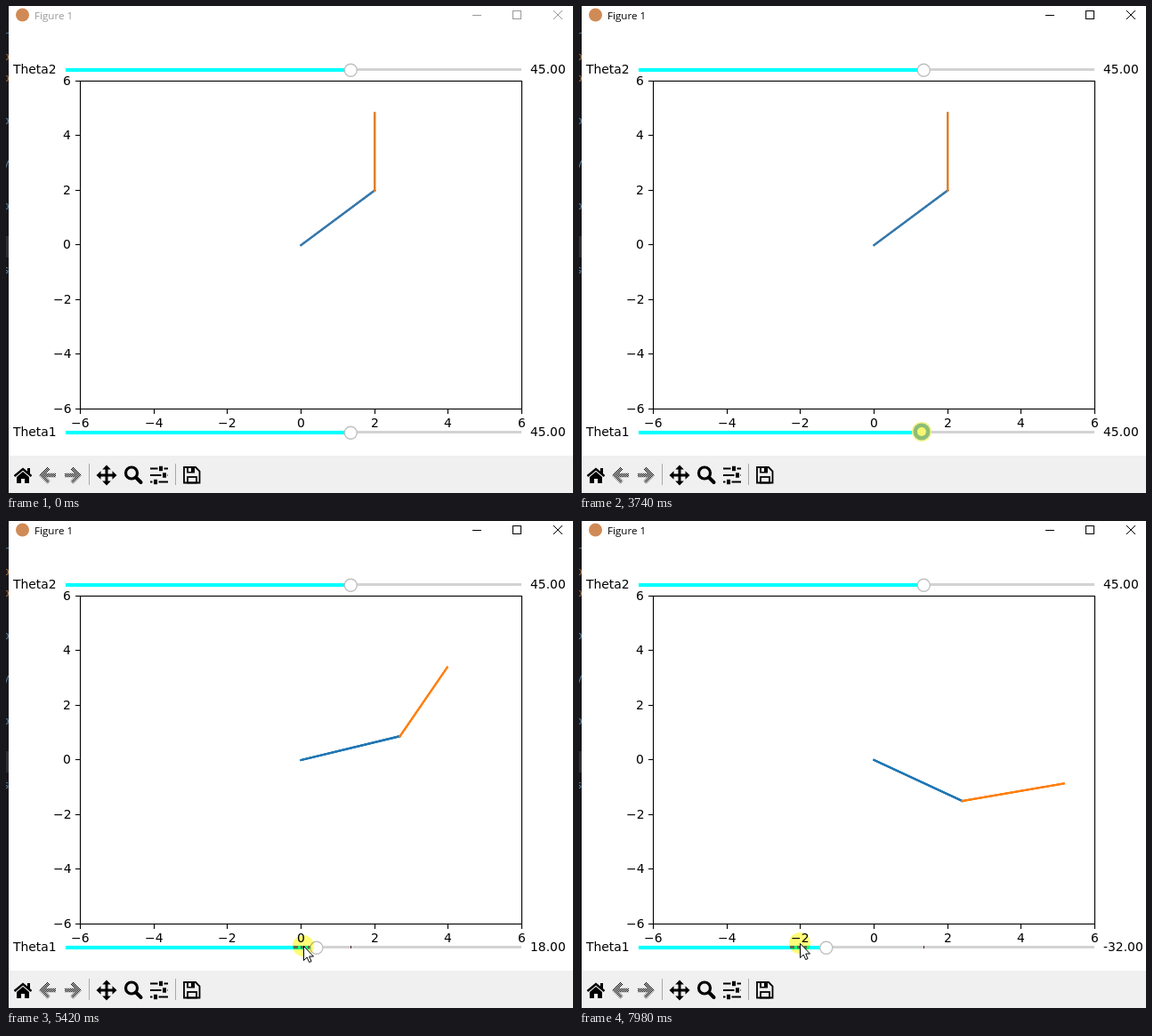
Write an HTML page with a canvas that moves like this. It is 637 px wide and 548 px high and loops after 8000 ms.

```html
<!DOCTYPE html>
<html lang="en">
<head>
<meta charset="utf-8">
<title>Arm sliders</title>
<style>
html, body { margin: 0; width: 100%; height: 100%; overflow: hidden; background: #fff; }
canvas { display: block; }
</style>
</head>
<body>
<canvas id="stage" width="637" height="548"></canvas>
<script>
const W = 637, H = 548, LOOP = 8000, TAU = Math.PI * 2;
const ctx = document.getElementById('stage').getContext('2d');
const PLOT_FONT = '13.89px "DejaVu Sans", sans-serif';
const HAIR = 1.11;

// plot box, limits -6..6 on both axes
const BOX = { x: 83.5, y: 84.5, w: 496, h: 369 };
const plotX = v => BOX.x + BOX.w * (v + 6) / 12;
const plotY = v => BOX.y + BOX.h * (6 - v) / 12;
const sliderX = deg => 67 + 512 * (deg + 180) / 360;
const ARM = 2 * Math.SQRT2;

// moments of the story
const ENTER = 430, CLICK = 1770, RELEASE = 1950, PRESS = 3030, HOLD = 3360, DRAG = 3820;

// time, x, y of the pointer tip
const POINTER = [
  [ENTER, 517, 545], [1200, 392, 484], [1640, 407, 455], [2130, 407, 455],
  [2400, 387, 497], [2600, 387, 480], [3740, 385, 479], [4300, 372, 481],
  [5420, 334, 478], [6310, 311, 481], [7150, 284, 477], [7980, 248, 475]
];
// time, degrees of the lower slider
const ANGLE = [[3780, 45], [4300, 39], [4960, 32], [5420, 18], [6310, -6], [6870, -9], [7150, -18], [7980, -32]];

function sample(keys, t) {
  const n = keys.findIndex(k => k[0] > t);
  if (n === 0) return keys[0].slice(1);
  if (n < 0) return keys[keys.length - 1].slice(1);
  const a = keys[n - 1], b = keys[n], f = (t - a[0]) / (b[0] - a[0]);
  return a.map((v, i) => v + (b[i] - v) * f).slice(1);
}

function rect(x, y, w, h, color) {
  ctx.fillStyle = color;
  ctx.fillRect(x, y, w, h);
}

function frame(x, y, w, h, color, width) {
  ctx.strokeStyle = color;
  ctx.lineWidth = width;
  ctx.strokeRect(x, y, w, h);
}

function disc(x, y, r, color) {
  ctx.fillStyle = color;
  ctx.beginPath();
  ctx.arc(x, y, r, 0, TAU);
  ctx.fill();
}

function outline(color, width, cap = 'butt') {
  ctx.strokeStyle = color;
  ctx.lineWidth = width;
  ctx.lineCap = cap;
  ctx.stroke();
}

function trace(pts, close) {
  ctx.beginPath();
  pts.forEach(p => ctx.lineTo(...p));
  if (close) ctx.closePath();
}

function poly(pts, color) {
  trace(pts, true);
  ctx.fillStyle = color;
  ctx.fill();
}

function line(pts, color, width, cap) {
  trace(pts);
  outline(color, width, cap);
}

// align: 0 left, 0.5 centre, 1 right; glyphs start on whole pixels
function text(s, x, y, align = 0, color = '#000', font = PLOT_FONT) {
  ctx.font = font;
  ctx.fillStyle = color;
  ctx.fillText(s, Math.round(x - align * ctx.measureText(s).width), Math.round(y));
}

function makeStipple() {
  const c = document.createElement('canvas');
  c.width = c.height = 2;
  const g = c.getContext('2d');
  g.fillRect(0, 0, 1, 1);
  g.fillRect(1, 1, 1, 1);
  return ctx.createPattern(c, 'repeat');
}
const stipple = makeStipple();

// sliver of the editor behind the window
function drawEditor() {
  rect(0, 0, 3, H, '#18181c');
  rect(0, 259, 3, 24, '#303034');
  ctx.save();
  ctx.beginPath();
  ctx.rect(0, 0, 3, H);
  ctx.clip();
  [...'rpp o y o  s'].forEach((ch, i) =>
    text(ch, 4, 37 + 24 * i, 1, ch === 'p' ? '#a5703f' : '#5a84a2', '13px "DejaVu Sans Mono", monospace'));
  ctx.restore();
}

function drawTitle(active) {
  const color = active ? '#000' : '#999';
  disc(18.5, 10, 7.5, '#d08a55');
  text('Figure 1', 32, 15, 0, color, '11.6px "Open Sans", sans-serif');
  line([[524, 10.5], [534, 10.5]], color, 1);
  frame(569.5, 5.5, 9, 9, color, 1);
  line([[615, 5], [625, 15]], color, 1);
  line([[625, 5], [615, 15]], color, 1);
}

function drawAxes() {
  frame(BOX.x, BOX.y, BOX.w, BOX.h, '#000', HAIR);
  for (let v = -6; v <= 6; v += 2) {
    const label = String(v).replace('-', '\u2212');
    const x = Math.floor(plotX(v)), y = Math.floor(plotY(v) - 0.3);
    line([[x + 0.5, 454], [x + 0.5, 459]], '#000', HAIR);
    line([[78, y + 0.5], [83, y + 0.5]], '#000', HAIR);
    text(label, x, 474, 0.5);
    text(label, 73, y + 5, 1);
  }
}

// the plot repaints itself, which hardens the line edges
function link(a, b, color) {
  for (let i = 0; i < 3; i++) line([a, b], color, 2.08, 'square');
}

function drawArm(deg, dragging) {
  const a = deg * Math.PI / 180, b = a + Math.PI / 4;
  const jx = ARM * Math.cos(a), jy = ARM * Math.sin(a);
  const elbow = [plotX(jx), plotY(jy)];
  const tip = [plotX(jx + ARM * Math.cos(b)), plotY(jy + ARM * Math.sin(b))];
  link([plotX(0), plotY(0)], elbow, dragging ? '#1f77b4' : '#3879ab');
  link(elbow, tip, dragging ? '#ff7f0e' : '#df7f2a');
}

function drawSlider(name, deg, y) {
  const x = sliderX(deg);
  rect(67, y - 2, 512, 3, '#d3d3d3');
  rect(67, y - 2, x - 67, 4, '#0ff');
  frame(67.5, y - 1.5, x - 68, 3, '#0ff', HAIR);
  rect(387, y - 2, 1, 3, '#502020');
  disc(x + 0.3, y + 0.3, 7, '#fff');
  outline('#bfbfbf', 1.39);
  text(name, 57, y + 4, 1);
  text(deg.toFixed(2), 589, y + 4);
}

function arrow(dir, cx) {
  ctx.save();
  ctx.translate(cx, 528);
  ctx.scale(dir, 1);
  line([[9, 0], [-7, 0]], stipple, 4.5);
  line([[1, -8], [-7, 0], [1, 8]], stipple, 4);
  ctx.restore();
}

function drawToolbar() {
  rect(3, 506, W - 3, 42, '#f0f0f0');
  rect(93, 515, 1, 24, '#a8a8a8');
  rect(190, 515, 1, 24, '#a8a8a8');

  // home
  line([[9.5, 529], [19, 521], [28.5, 529]], '#000', 2.4);
  rect(24, 520, 3, 6, '#000');
  poly([[12, 530], [19, 524], [26, 530], [26, 537], [12, 537]], '#000');
  rect(17, 532, 4, 5, '#f0f0f0');

  arrow(1, 47);
  arrow(-1, 75);

  // pan
  ctx.save();
  ctx.translate(113, 528);
  for (let i = 0; i < 4; i++) {
    rect(-1.5, -8, 3, 8, '#000');
    poly([[0, -11.5], [4.8, -6.5], [-4.8, -6.5]], '#000');
    ctx.rotate(TAU / 4);
  }
  ctx.restore();

  // zoom
  ctx.beginPath();
  ctx.arc(141, 525.5, 6.5, 0, TAU);
  outline('#000', 3.2);
  line([[146, 530.5], [151.5, 536]], '#000', 4, 'round');

  // sliders
  [174, 178, 168].forEach((knob, i) => {
    const y = 520.5 + 7.5 * i;
    rect(162, y - 1, 20, 2, '#000');
    rect(knob - 3.5, y - 3, 7, 6, '#f0f0f0');
    rect(knob - 2, y - 2.7, 4, 5.4, '#000');
  });

  // save
  trace([[200, 519], [213, 519], [217.5, 523.5], [217.5, 536.5], [200, 536.5]], true);
  outline('#000', 1.8);
  frame(204, 530, 10, 6.5, '#000', 1.8);
  rect(203, 518.5, 9, 7, '#000');
  rect(205, 520, 3, 4, '#f0f0f0');
}

function drawRing(x, y) {
  disc(x, y, 11, '#f2f38a');
  disc(x, y, 9.5, '#8dbd78');
  disc(x, y, 5, '#f6f670');
}

function drawSpot(x, y) {
  ctx.save();
  ctx.globalCompositeOperation = 'multiply';
  disc(x, y, 12, '#fffc78');
  ctx.restore();
}

// worn stretch of the bar beneath the spot
function drawWear(x, knob) {
  ctx.save();
  ctx.setLineDash([5, 3]);
  line([[x - 11, 479.5], [Math.min(x + 8, knob - 7), 479.5]], '#5f6a50', 3);
  ctx.restore();
}

function drawPointer(x, y) {
  ctx.save();
  ctx.translate(Math.round(x) + 0.5, Math.round(y) + 0.5);
  poly([[0, 0], [0, 16], [3.7, 12.5], [6.2, 18], [8.6, 17], [6.2, 11.5], [11, 11.5]], '#fff');
  outline('#000', 1);
  ctx.restore();
}

function draw(t) {
  const dragging = t >= DRAG;
  const deg = Math.round(sample(ANGLE, t)[0]);
  rect(0, 0, W, H, '#fff');
  drawEditor();
  drawTitle(t >= CLICK);
  drawAxes();
  drawArm(deg, dragging);
  drawSlider('Theta2', 45, 72);
  drawSlider('Theta1', deg, 480);
  drawToolbar();

  if (t < ENTER) return;
  const [x, y] = sample(POINTER, t);
  if (t >= HOLD && !dragging) return drawRing(x, y);
  if ((t >= CLICK && t < RELEASE) || t >= PRESS) drawSpot(x, y);
  if (dragging) drawWear(x, sliderX(deg));
  drawPointer(x, y);
}

function tick() {
  draw(performance.now() % LOOP);
  requestAnimationFrame(tick);
}
tick();
</script>
</body>
</html>
```
